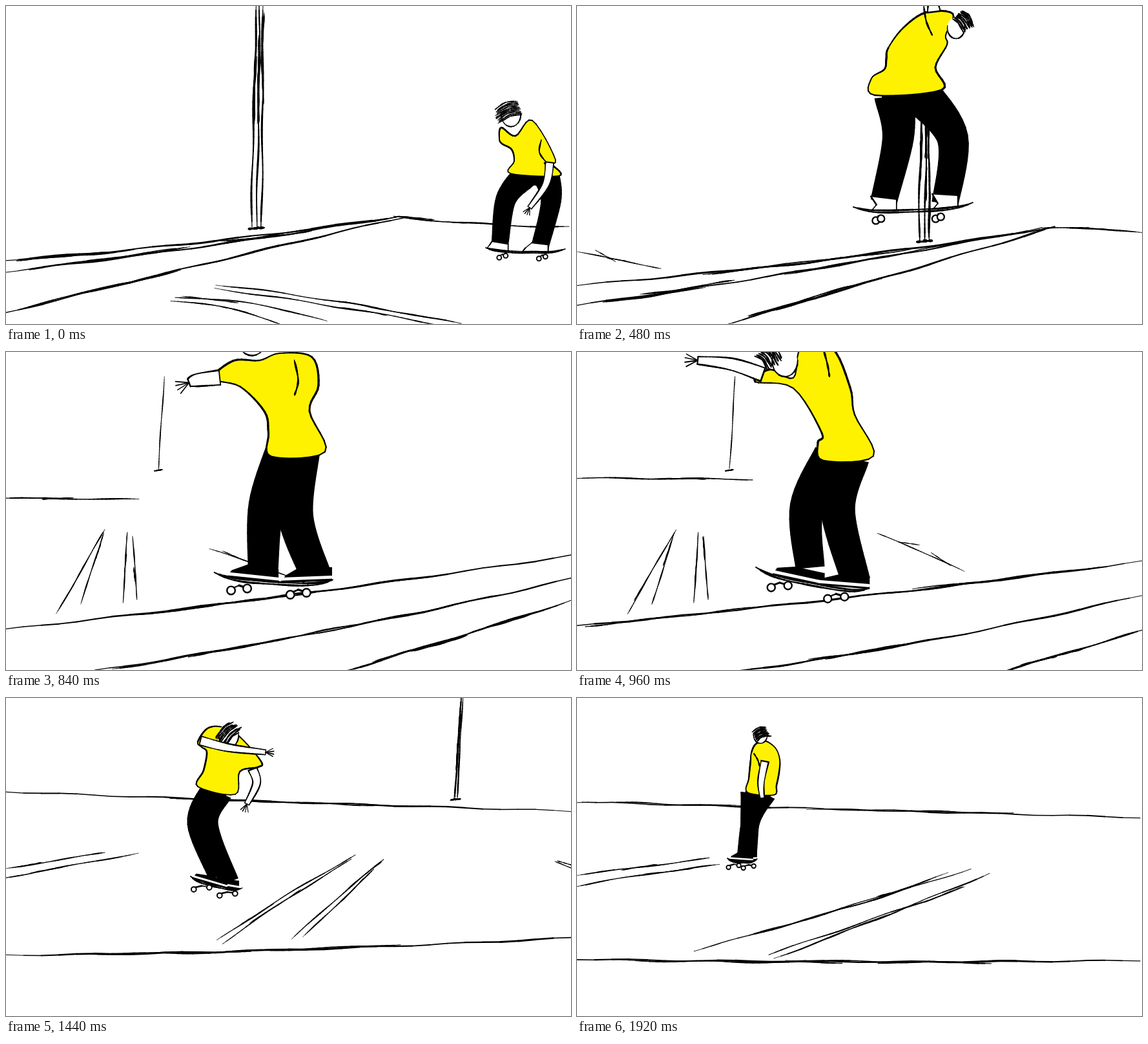
Animation, 875 px wide and 492 px high, one loop 2040 ms. Source, as an HTML page with a canvas:

```html
<!DOCTYPE html>
<html lang="en">
<head>
<meta charset="utf-8">
<title>Skater</title>
<style>
html, body { margin: 0; width: 100%; height: 100%; overflow: hidden; background: #fff; }
canvas { display: block; width: 100vw; height: 100vh; }
</style>
</head>
<body>
<canvas id="stage" width="875" height="492"></canvas>
<script>
const ctx = document.getElementById('stage').getContext('2d');
const STEP = 120, LOOP = 2040;
const BLACK = '#000', WHITE = '#fff', YELLOW = '#fff200';

// Widths along a limb, as parts of the body size.
const LEG = [0.2, 0.155, 0.13], ARM = [0.065, 0.055, 0.035];

// Ink weight, number of passes and looseness of each sort of ground line.
const INK = {
  ledge: [2.5, 4, 2.5], far: [2, 3, 1.5], crack: [1.7, 2, 1.5], streak: [1.4, 3, 8]
};

// Key poses. Joints are x, y pairs; shirt runs clockwise from the left sleeve.
// head: centre, radius, hair centre, hair flow. board: both ends, wheel spread.
// ground lines: both ends and an optional bend. pole, post: top, foot, width.
const poses = [
{ at: 0, size: 195, toe: 27, dark: 0, board: [743, 374, 866, 376, 5],
  legs: { a: [802, 264, 774, 300, 765, 367], b: [838, 266, 844, 302, 827, 372] },
  shirt: [764, 205, 767, 188, 789, 201, 815, 177, 851, 238, 834, 243, 847, 247, 856, 263, 781, 259, 787, 240, 783, 222, 768, 213],
  head: [782, 168, 17, 778, 164, -34, 12], fold: [829, 207, 826, 226, 836, 241],
  arms: { r: [842, 242, 836, 276, 811, 312] },
  ground: { ledgeA: [0, 393, 605, 326, 6], ledgeB: [0, 411, 610, 325, 4], ledgeC: [0, 475, 615, 327, -2],
    farR: [600, 326, 872, 342, 3], crackA: [325, 431, 705, 492, -4], crackB: [323, 437, 665, 492, -2],
    crackC: [262, 451, 497, 488, -9], crackD: [255, 456, 425, 492, -7] },
  pole: [393, -4, 388, 344, 13] },

{ at: 2, size: 245, toe: 25, dark: 0, board: [555, 378, 712, 379, 6],
  legs: { a: [592, 232, 592, 292, 583, 373], b: [628, 234, 660, 296, 668, 378] },
  shirt: [560, 149, 621, 127, 640, 146, 660, 137, 686, 189, 664, 187, 642, 204, 651, 231, 564, 235, 575, 206, 583, 178, 562, 170],
  head: [647, 122, 19, 656, 103, 44, 4], fold: [604, 160, 611, 174, 600, 188],
  arms: { l: [571, 160, 553, 157, 537, 157], r: [675, 190, 692, 224, 711, 264] },
  ground: { ledgeA: [0, 409, 600, 330], ledgeB: [0, 431, 590, 333, 4], ledgeC: [0, 486, 580, 335, -1],
    farR: [570, 330, 875, 347, -1], crackA: [263, 470, 372, 492, 2], crackB: [263, 470, 325, 492], crackE: [0, 467, 150, 443, 2] },
  pole: [413, -4, 405, 349, 12] },

{ at: 4, size: 305, toe: 18, dark: 0, board: [428, 311, 613, 304, 4],
  legs: { a: [492, 140, 497, 205, 475, 303], b: [533, 138, 582, 205, 570, 305] },
  shirt: [482, 65, 505, 34, 540, 10, 582, 12, 571, 45, 573, 60, 555, 95, 565, 130, 461, 138, 456, 112, 476, 98, 479, 82],
  head: [587, 34, 15, 598, 24, 16, 20], fold: [537, 0, 541, 24, 550, 45],
  arms: { r: [553, 9, 552, 0, 552, -14] },
  ground: { ledgeA: [0, 432, 740, 342, 7], ledgeB: [0, 463, 720, 343, 5], ledgeC: [225, 494, 740, 342],
    farR: [720, 344, 875, 351, -3], streak: [0, 380, 130, 406] },
  pole: [540, 150, 538, 364, 13] },

{ at: 6, size: 365, toe: 52, dark: 1, board: [368, 349, 560, 339, 12],
  legs: { a: [478, 138, 451, 235, 435, 343], b: [484, 138, 492, 262, 530, 340] },
  shirt: [365, 36, 405, 0, 450, -14, 500, 10, 552, 21, 545, 48, 510, 86, 529, 148, 440, 155, 440, 110, 422, 60, 390, 51],
  head: [440, -60, 30, 440, -70, -30, 10], fold: [511, 28, 517, 68, 503, 95],
  arms: { l: [374, 44, 352, 68, 380, 82], r: [549, 35, 592, 38, 662, 76] },
  ground: { ledgeA: [0, 434, 875, 306, 5], ledgeB: [25, 492, 875, 325, 8], ledgeC: [395, 492, 875, 338, 2],
    farL: [0, 257, 140, 259], streak: [165, 329, 335, 380, -3], crackE: [343, 317, 392, 325] },
  pole: [763, -4, 741, 330, 13] },

{ at: 8, size: 335, toe: 58, dark: 1, board: [277, 333, 452, 366, 13],
  legs: { a: [398, 166, 356, 240, 361, 333], b: [418, 164, 404, 245, 432, 355] },
  shirt: [276, 46, 299, 27, 335, 40, 347, -6, 395, -6, 423, 55, 430, 97, 459, 161, 381, 168, 373, 140, 379, 125, 335, 56],
  head: [322, 14, 22, 297, 8, 20, 22], fold: [382, -3, 388, 20, 391, 38],
  arms: { l: [288, 35, 240, 19, 187, 13] },
  ground: { ledgeA: [0, 424, 875, 324, 4], ledgeB: [250, 494, 875, 376, 8], ledgeC: [660, 494, 875, 431],
    farL: [0, 195, 272, 197], crackA: [153, 275, 78, 405], crackB: [151, 280, 116, 390],
    crackC: [188, 279, 181, 388], crackD: [196, 285, 203, 383], streak: [465, 281, 600, 340, -2] },
  post: [245, 38, 236, 183, 1] },

{ at: 12, size: 215, toe: 38, dark: 1, board: [286, 276, 366, 294, 12],
  legs: { a: [328, 146, 311, 195, 346, 284], b: [322, 146, 298, 195, 328, 275] },
  shirt: [297, 68, 312, 47, 335, 45, 362, 60, 395, 98, 390, 107, 362, 114, 355, 149, 297, 137, 306, 112, 311, 84, 303, 76],
  head: [345, 58, 17, 344, 56, 24, -24],
  arms: { l: [301, 66, 345, 77, 402, 84], r: [382, 110, 388, 132, 373, 164] },
  ground: { ledgeA: [0, 398, 875, 371, 5], farL: [0, 145, 875, 175, 1],
    crackA: [541, 243, 327, 375, 3], crackB: [535, 250, 335, 380, 3], crackC: [585, 250, 443, 373, 2],
    crackD: [570, 265, 460, 370], crackF: [0, 264, 153, 239], crackG: [0, 278, 205, 240], streak: [850, 253, 930, 285] },
  post: [706, -4, 696, 157, 4] },

{ at: 16, size: 180, toe: 24, dark: 1, board: [233, 248, 279, 249, 8],
  legs: { a: [272, 148, 268, 187, 266, 245], b: [289, 148, 270, 187, 260, 245] },
  shirt: [270, 85, 276, 72, 290, 66, 307, 77, 314, 95, 313, 115, 309, 135, 305, 150, 264, 146, 266, 125, 268, 105, 269, 95],
  head: [284, 57, 12, 285, 56, 20, -8], fold: [274, 86, 280, 96, 283, 106],
  arms: { r: [291, 98, 285, 130, 287, 155] },
  ground: { ledgeA: [0, 404, 872, 406, 3], farL: [0, 161, 872, 185],
    crackA: [610, 264, 181, 391, -3], crackB: [575, 271, 265, 368, -3], crackC: [639, 271, 305, 403, -2],
    crackD: [600, 293, 297, 397], crackF: [0, 274, 205, 248], crackG: [0, 291, 221, 258, -2] },
  post: [1010, -4, 996, 165, 4] }
];

const lerp = (a, b, t) => a + (b - a) * t;
const pairs = list => Array.from({ length: list.length / 2 }, (_, i) => [list[2 * i], list[2 * i + 1]]);

// Blend two poses; a part found in only one of them belongs to the nearer pose.
function mix(a, b, t) {
  if (a === undefined || b === undefined) return t < 0.5 ? a : b;
  if (typeof a === 'number') return lerp(a, b, t);
  if (Array.isArray(a)) {
    const n = Math.max(a.length, b.length);
    return Array.from({ length: n }, (_, i) => lerp(a[i] || 0, b[i] || 0, t));
  }
  const keys = new Set([...Object.keys(a), ...Object.keys(b)]);
  return Object.fromEntries([...keys].map(k => [k, mix(a[k], b[k], t)]).filter(e => e[1] !== undefined));
}

let seed = 1;
function rand() {
  seed = seed * 16807 % 2147483647;
  return seed / 2147483647;
}
const spread = amount => (rand() * 2 - 1) * amount;

function spline(a, b, c, d, t) {
  return b + 0.5 * t * (c - a + t * (2 * a - 5 * b + 4 * c - d + t * (3 * (b - c) + d - a)));
}

// Smooth curve through the points, sampled n + 1 times.
function curve(pts, n, closed) {
  const len = pts.length, spans = closed ? len : len - 1;
  const get = i => closed ? pts[(i + len) % len] : pts[Math.max(0, Math.min(len - 1, i))];
  return Array.from({ length: n + 1 }, (_, k) => {
    const u = k / n * spans, i = Math.min(spans - 1, Math.floor(u));
    return get(i).map((v, c) => spline(get(i - 1)[c], v, get(i + 1)[c], get(i + 2)[c], u - i));
  });
}

// Ink stroke whose weight swells along its way and tapers at both ends.
function brush(line, width, tapered = true) {
  const n = line.length - 1, phase = rand() * 6;
  ctx.strokeStyle = BLACK;
  for (let i = 0; i < n; i++) {
    const u = (i + 0.5) / n, end = tapered ? Math.min(1, 0.4 + 8 * Math.min(u, 1 - u)) : 1;
    ctx.lineWidth = width * end * (1 + 0.25 * Math.sin(phase + u * 17));
    ctx.beginPath();
    ctx.moveTo(...line[i]);
    ctx.lineTo(...line[i + 1]);
    ctx.stroke();
  }
}

function fill(line, color) {
  ctx.fillStyle = color;
  ctx.beginPath();
  line.forEach(p => ctx.lineTo(...p));
  ctx.fill();
}

function shape(line, color, width) {
  fill(line, color);
  brush([...line, line[0]], width, false);
}

// Loose line: one full stroke, then shorter ones over it.
function sketch([x0, y0, x1, y1, bend = 0], [width, passes, loose]) {
  const len = Math.hypot(x1 - x0, y1 - y0), nx = (y0 - y1) / len, ny = (x1 - x0) / len;
  for (let k = 0; k < passes; k++) {
    const from = k ? rand() * 0.6 : 0, to = k ? from + 0.2 + rand() * 0.2 : 1;
    const start = k ? spread(loose) : 0, stop = k ? spread(loose) : 0, phase = rand() * 6;
    const line = Array.from({ length: 33 }, (_, i) => {
      const v = i / 32, u = lerp(from, to, v);
      const off = bend * 4 * u * (1 - u) + lerp(start, stop, v) + Math.min(1, len / 300) * Math.sin(phase + u * len / 23);
      return [lerp(x0, x1, u) + nx * off, lerp(y0, y1, u) + ny * off];
    });
    brush(line, k ? width * 0.8 : width);
  }
}

function drawPole([x0, y0, x1, y1, w]) {
  for (const side of w > 2 ? [-0.5, 0, 0.5] : [0]) {
    sketch([x0 + side * w * 0.7, y0, x1 + side * w * 1.2, y1, spread(w / 6)], [1.4 + w / 12, w > 2 ? 3 : 1, w / 5]);
  }
  sketch([x1 - w / 2 - 6, y1 + 1, x1 + w / 2 + 6, y1 - 1], [1.6 + w / 8, 2, w / 4]);
}

// Outline of a limb that follows its joints with the given widths.
function limb(joints, widths, size) {
  const mid = curve(pairs(joints).map(([x, y], i) => [x, y, widths[i] * size / 2]), 20);
  const side = s => mid.map(([x, y, w], i) => {
    const a = mid[Math.max(0, i - 1)], b = mid[Math.min(20, i + 1)];
    const dx = b[0] - a[0], dy = b[1] - a[1], len = Math.hypot(dx, dy) || 1;
    return [x - s * dy / len * w, y + s * dx / len * w];
  });
  return [...side(1), ...side(-1).reverse()];
}

function drawLegs({ a, b }, size) {
  ctx.strokeStyle = BLACK;
  ctx.lineWidth = size * 0.13;
  ctx.beginPath();
  ctx.moveTo(a[0], a[1]);
  ctx.lineTo(b[0], b[1]);
  ctx.stroke();
  for (const leg of [a, b]) shape(limb(leg, LEG, size), BLACK, 1.5);
}

function drawArm(joints, size, ink) {
  shape(limb(joints, ARM, size), WHITE, ink);
  const [ex, ey, hx, hy] = joints.slice(2), angle = Math.atan2(hy - ey, hx - ex);
  for (const turn of [-0.6, -0.25, 0.1, 0.4]) {
    const reach = size * 0.06, a = angle + turn;
    brush([[hx, hy], [hx + Math.cos(a) * reach, hy + Math.sin(a) * reach]], ink * 0.7);
  }
}

function drawHead([x, y, r, hx, hy, fx, fy], ink) {
  const jaw = Array.from({ length: 25 }, (_, i) => {
    const a = i / 24 * Math.PI * 2 - 0.3;
    return [x + Math.cos(a) * r * 0.9, y + Math.sin(a) * r * 1.1];
  });
  fill(jaw, WHITE);
  brush(jaw.slice(0, 15), ink * 0.8);
  const flow = Math.hypot(fx, fy), px = -fy / flow, py = fx / flow;
  for (let i = 0; i < 10; i++) {
    const s = (i / 4.5 - 1) * r * 0.65, reach = 0.4 + rand() * 0.25;
    const at = (along, out) => [hx + fx * along + px * s + spread(1.5), hy + fy * along + py * s - out];
    brush(curve([at(-0.5, 0), at(0, r * 0.25), at(reach, 0)], 10), ink * 0.9);
  }
}

function boardCurve([x0, y0, x1, y1], sag) {
  return u => [lerp(x0, x1, u), lerp(y0, y1, u) + sag * (1 - (2 * u - 1) ** 4)];
}

function drawShoe(leg, deck, board, { size, toe, dark }, ink) {
  const [x, y] = leg.slice(4), half = LEG[2] * size / 2, h = size * 0.055;
  const ground = px => deck((px - board[0]) / (board[2] - board[0]))[1];
  const heel = Math.min(x + half, board[2]), tip = Math.max(x - toe, board[0] + 2);
  const top = [[heel, ground(heel) - h], [x - half, ground(x) - h * 1.3], [tip + h * 0.4, ground(tip) - h * 0.5], [tip, ground(tip)]];
  shape([...top, [heel, ground(heel)]], dark > 0.5 ? BLACK : WHITE, ink * 0.8);
  if (dark > 0.5) {
    ctx.strokeStyle = WHITE;
    ctx.lineWidth = size * 0.014;
    ctx.beginPath();
    ctx.moveTo(tip, ground(tip) - h * 0.25);
    ctx.lineTo(heel, ground(heel) - h * 0.25);
    ctx.stroke();
  }
}

function drawBoard(board, size, ink) {
  for (const sag of [0.025, 0.036]) {
    const deck = boardCurve(board, size * sag);
    brush(Array.from({ length: 25 }, (_, i) => deck(i / 24)), ink);
  }
  const deck = boardCurve(board, size * 0.03), gap = board[4], r = size * 0.018;
  for (const u of [0.21, 0.71]) {
    const [x, y] = deck(u), drop = y + size * 0.042;
    brush([[x - gap, drop - 1], [x, drop - r], [x + gap, drop - 2]], ink);
    for (const side of [-1, 1]) {
      ctx.beginPath();
      ctx.arc(x + side * gap, drop - side * 1.5, r, 0, 7);
      ctx.fillStyle = WHITE;
      ctx.fill();
      ctx.lineWidth = ink * 0.9;
      ctx.stroke();
    }
  }
}

function drawSkater(pose) {
  const { size, board, legs } = pose, ink = 1.4 + size / 270;
  const deck = boardCurve(board, size * 0.025);
  drawLegs(legs, size);
  drawShoe(legs.a, deck, board, pose, ink);
  drawShoe(legs.b, deck, board, pose, ink);
  drawBoard(board, size, ink);
  shape(curve(pairs(pose.shirt), 72, true), YELLOW, ink);
  if (pose.fold) brush(curve(pairs(pose.fold), 14), ink);
  drawHead(pose.head, ink);
  Object.values(pose.arms).forEach(arm => drawArm(arm, size, ink * 0.85));
}

function draw(step) {
  let i = 0;
  while (i < poses.length - 2 && poses[i + 1].at <= step) i++;
  const from = poses[i], to = poses[i + 1];
  const pose = mix(from, to, (step - from.at) / (to.at - from.at));
  seed = 7919 * (step + 3);
  ctx.fillStyle = WHITE;
  ctx.fillRect(0, 0, 875, 492);
  for (const [name, line] of Object.entries(pose.ground)) sketch(line, INK[name.replace(/[A-Z]$/, '')]);
  if (pose.pole) drawPole(pose.pole);
  if (pose.post) drawPole(pose.post);
  drawSkater(pose);
}

ctx.lineCap = ctx.lineJoin = 'round';
const start = performance.now();
let shown = -1;

function tick() {
  const step = Math.floor((performance.now() - start) % LOOP / STEP);
  if (step !== shown) draw(shown = step);
  requestAnimationFrame(tick);
}
tick();
</script>
</body>
</html>
```
